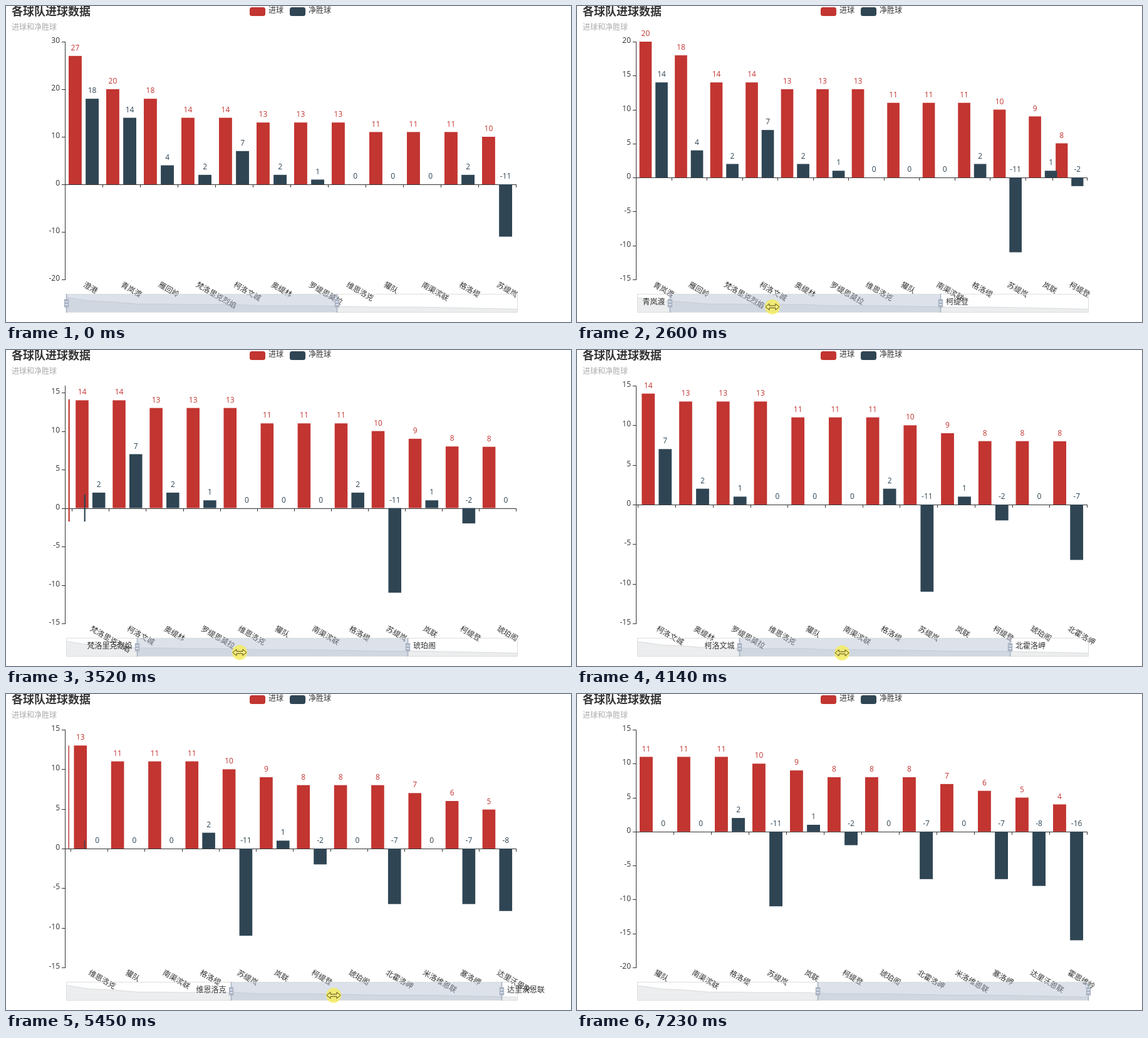
An HTML page with a canvas for the animation above (8160 ms loop, 902 by 505 pixels).

```html
<!DOCTYPE html>
<html lang="zh-CN">
<head>
<meta charset="utf-8">
<title>各球队进球数据</title>
<style>
html, body { margin: 0; width: 100%; height: 100%; overflow: hidden; background: #fff; }
canvas { display: block; width: 902px; height: 505px; }
</style>
</head>
<body>
<canvas id="chart" width="902" height="505"></canvas>
<script>
const ctx = document.getElementById('chart').getContext('2d');
const LOOP = 8160, STEP = 77.4, FIRST = 340;
const EASE_MS = 300, LEAVE_MS = 240, GROW_WAIT = 28, LAG = 140;
const RED = '#c23531', NAVY = '#2f4554', INK = '#333';
const FONT = '"Open Sans", "Noto Sans CJK SC", "Noto Sans CJK", sans-serif';
const LEFT = 94, WIDTH = 720, TOP = 57, BOTTOM = 437;
const RAIL = 96.5, RAIL_TOP = 460, RAIL_H = 30, SPAN = WIDTH * 0.6;

const teams = ['澄港', '青岚渡', '雁回岭', '梵洛里克烈焰', '柯洛文城', '奥缇林', '罗缇恩莫拉',
  '维恩洛克', '獾队', '南渠滨联', '格洛缇', '苏缇岚', '岚联', '柯缇登', '琥珀阁',
  '北霍洛岬', '米洛维恩联', '塞洛岬', '达里沃恩联', '霍恩维岭'];
const goals = [27, 20, 18, 14, 14, 13, 13, 13, 11, 11, 11, 10, 9, 8, 8, 8, 7, 6, 5, 4];
const diffs = [18, 14, 4, 2, 7, 2, 1, 0, 0, 0, 2, -11, 1, -2, 0, -7, 0, -7, -8, -16];
const LAST = teams.length - 1;

// Key points of the drag: [time, distance]
const drag = [[1169, 0], [1578, 15], [1900, 18.9], [2332, 41.7], [2585, 52], [3249, 94.7],
  [3513, 113], [3810, 132.6], [4132, 163], [5168, 246.3], [5448, 263], [5850, 288]];

const clamp = v => Math.max(0, Math.min(1, v));
const easeOut = v => 1 - Math.pow(1 - clamp(v), 3);
const mix = (a, b, p) => a.map((v, i) => v + (b[i] - v) * p);

function dragged(t) {
  const next = drag.findIndex(point => point[0] > t);
  if (next === 0) return 0;
  if (next < 0) return drag[drag.length - 1][1];
  const [t0, v0] = drag[next - 1], [t1, v1] = drag[next];
  return v0 + (v1 - v0) * (t - t0) / (t1 - t0);
}

const isBar = key => key[0] === 'g' || key[0] === 'd';

// Keys: z zero line, y value ticks, x team slots, g and d bars [x, width, base, height]
function layout(a, b) {
  const values = goals.slice(a, b + 1).concat(diffs.slice(a, b + 1));
  const max = Math.max(0, ...values), min = Math.min(0, ...values);
  const step = (max - min) / 5 < 7 ? 5 : 10;
  const hi = Math.ceil(max / step) * step, lo = Math.floor(min / step) * step;
  const unit = (BOTTOM - TOP) / (hi - lo), zero = BOTTOM + lo * unit;
  const band = WIDTH / (b - a + 1), w = band * 0.8 / 2.3;
  const out = { z: [zero] };
  for (let v = lo; v <= hi; v += step) out['y' + v] = [zero - v * unit];
  for (let i = a; i <= b; i++) {
    const x = LEFT + (i - a) * band, bar = x + band * 0.1;
    out['x' + i] = [x, x + band / 2];
    out['g' + i] = [bar, w, zero, goals[i] * unit];
    out['d' + i] = [bar + w * 1.3, w, zero, diffs[i] * unit];
  }
  return out;
}

function sample(seg, t) {
  const out = {};
  for (const key in seg.to) {
    const wait = seg.fresh[key] ? GROW_WAIT : 0;
    out[key] = mix(seg.from[key], seg.to[key], easeOut((t - seg.start - wait) / EASE_MS));
  }
  return out;
}

function makeSegment(start, a, b, last) {
  const to = layout(a, b), from = {}, fresh = {}, gone = {};
  const now = last ? sample(last, start) : to;
  for (const key in to) {
    from[key] = now[key] || to[key];
    if (!now[key] && isBar(key)) {
      fresh[key] = true;
      from[key] = [...to[key].slice(0, 3), 0];
    }
  }
  for (const key in now) if (isBar(key) && !to[key]) gone[key] = now[key];
  return { start, a, b, from, to, fresh, gone };
}

// The chart follows the slider a little late and snaps to whole teams
const segs = [];
for (let t = 0; t < LOOP; t++) {
  const offset = dragged(t - LAG), last = segs[segs.length - 1];
  const a = Math.round(offset / WIDTH * LAST);
  const b = Math.round((offset + SPAN) / WIDTH * LAST);
  if (!last || a !== last.a || b !== last.b) segs.push(makeSegment(t, a, b, last));
}

function text(str, x, y, color = INK, align = 'left', font = '12px ') {
  ctx.font = font + FONT;
  ctx.fillStyle = color;
  ctx.textAlign = align;
  ctx.textBaseline = 'middle';
  ctx.fillText(str, x, y);
}

function box(x, y, w, h, color) {
  ctx.fillStyle = color;
  ctx.fillRect(x, y, w, h);
}

function legend(x, color, label) {
  ctx.fillStyle = color;
  ctx.beginPath();
  ctx.roundRect(x, 2, 25, 14, 3.5);
  ctx.fill();
  text(label, x + 30, 8);
}

function drawHeader() {
  text('各球队进球数据', 9, 10, INK, 'left', 'bold 18px ');
  text('进球和净胜球', 9, 35, '#aaa');
  legend(389, RED, '进球');
  legend(453, NAVY, '净胜球');
}

function drawAxes(state) {
  const zero = Math.round(state.z[0]);
  box(LEFT, TOP, 1, BOTTOM - TOP + 1, INK);
  box(LEFT, zero, WIDTH + 1, 1, INK);
  box(LEFT + WIDTH, zero, 1, 5, INK);
  for (const key in state) {
    const id = key.slice(1), [pos, mid] = state[key];
    if (key[0] === 'y') {
      box(LEFT - 5, Math.round(pos), 5, 1, INK);
      text(id, 86, pos - 1, INK, 'right');
    } else if (key[0] === 'x') {
      box(Math.round(pos), zero, 1, 5, INK);
      ctx.save();
      ctx.translate(mid, 445);
      ctx.rotate(Math.PI / 6);
      text(teams[id], 0, 0);
      ctx.restore();
    }
  }
}

function drawBars(seg, state, t) {
  const left = 1 - easeOut((t - seg.start) / LEAVE_MS);
  for (const [kind, color, data] of [['g', RED, goals], ['d', NAVY, diffs]]) {
    const own = set => Object.keys(set).filter(key => key[0] === kind);
    for (const key of own(state)) {
      const [x, w, base, h] = state[key];
      box(x, base, w, -h, color);
    }
    for (const key of own(seg.gone)) {
      const [x, w, base, h] = seg.gone[key];
      if (left > 0.03) box(x, base, w * left, -h, color);
    }
    for (const key of own(state)) {
      const [x, w, base, h] = state[key];
      text(data[key.slice(1)], x + w / 2, base - Math.max(h, 0) - 12, color, 'center');
    }
  }
}

function drawHandle(x) {
  const color = '#a9b3c4';
  box(x - 0.8, RAIL_TOP, 1.6, RAIL_H, color);
  box(x - 3.7, 468.5, 7.4, 13, color);
  for (const y of [472.1, 476.7]) box(x - 2.1, y, 4.2, 1.2, '#fff');
}

function drawSlider(seg, offset, named) {
  const end = RAIL_TOP + RAIL_H, x = RAIL + offset;
  ctx.beginPath();
  goals.forEach((v, i) => ctx.lineTo(RAIL + i * WIDTH / LAST, end - (v + 2.9) / 36.8 * RAIL_H));
  ctx.strokeStyle = 'rgba(47,69,84,.3)';
  ctx.lineWidth = 0.5;
  ctx.stroke();
  ctx.lineTo(RAIL + WIDTH, end);
  ctx.lineTo(RAIL, end);
  ctx.fillStyle = 'rgba(47,60,70,.09)';
  ctx.fill();

  box(x, RAIL_TOP, SPAN, RAIL_H, 'rgba(167,180,203,.4)');
  ctx.strokeStyle = '#ddd';
  ctx.lineWidth = 1;
  ctx.strokeRect(RAIL, RAIL_TOP + 0.5, WIDTH, RAIL_H - 1);
  drawHandle(x);
  drawHandle(x + SPAN);
  if (named) {
    text(teams[seg.a], x - 8, 473.5, INK, 'right');
    text(teams[seg.b], x + SPAN + 8.5, 473.5);
  }
}

function drawCursor(t, offset) {
  const away = 1 - easeOut((t - FIRST) / 310);
  const sway = Math.sin(Math.PI * clamp((t - 1190) / 5900)) ** 2;
  const x = 260 + offset - 10 * away + 8 * clamp((t - 5850) / 900);
  const y = 478 + 28 * away + 6 * sway;
  ctx.fillStyle = 'rgba(243,236,96,.85)';
  ctx.beginPath();
  ctx.arc(x, y, 12, 0, Math.PI * 2);
  ctx.fill();
  ctx.beginPath();
  for (const s of [-1, 1]) {
    ctx.lineTo(x + s * 5, y + s * 1.7);
    ctx.lineTo(x + s * 5, y + s * 5);
    ctx.lineTo(x + s * 11, y);
    ctx.lineTo(x + s * 5, y - s * 5);
    ctx.lineTo(x + s * 5, y - s * 1.7);
  }
  ctx.closePath();
  ctx.fillStyle = '#f3ee80';
  ctx.strokeStyle = '#5b4a16';
  ctx.lineWidth = 1;
  ctx.fill();
  ctx.stroke();
}

function draw(t) {
  const seg = segs.filter(s => s.start <= t).pop();
  const state = sample(seg, t), offset = dragged(t);
  box(0, 0, 902, 505, '#fff');
  drawHeader();
  drawAxes(state);
  drawBars(seg, state, t);
  drawSlider(seg, offset, t > 490 && t < 7140);
  if (t >= FIRST && t < 7220) drawCursor(t, offset);
}

// The picture advances in even steps
const snap = t => t < FIRST ? 0 : FIRST + Math.floor((t - FIRST) / STEP) * STEP;

const begin = performance.now();
function tick() {
  draw(snap((performance.now() - begin) % LOOP));
  requestAnimationFrame(tick);
}
tick();
</script>
</body>
</html>
```
